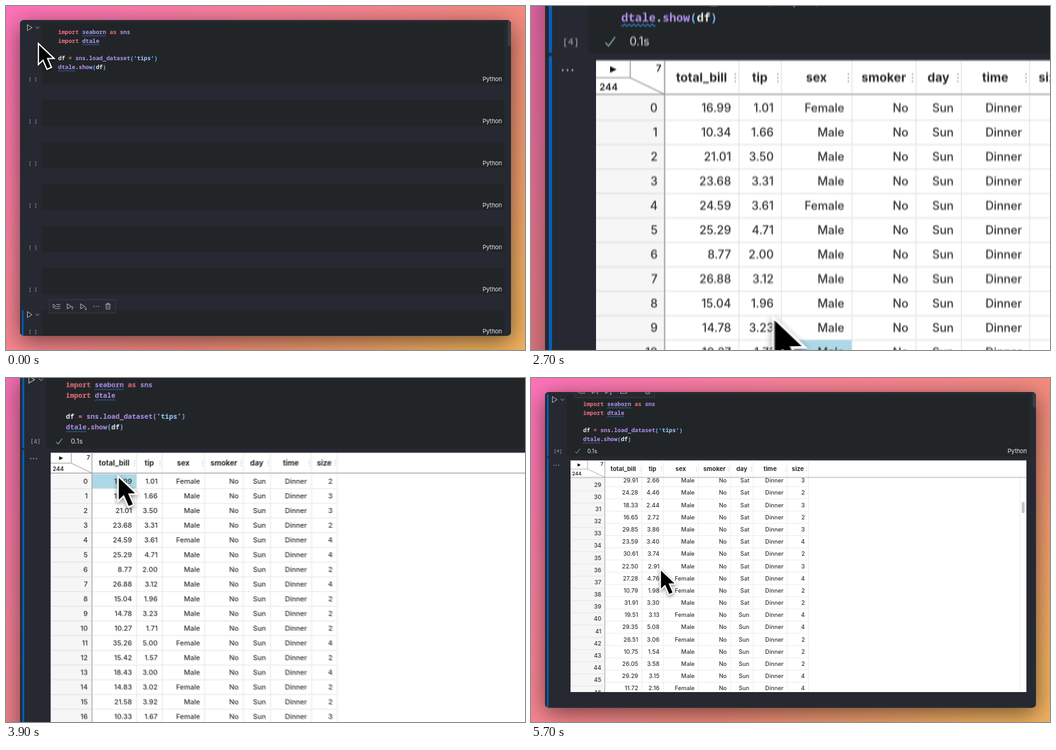
Write an HTML page with a canvas that moves like this. It is 814 by 540 pixels and loops after 5.8 s.

```html
<!DOCTYPE html>
<html lang="en">
<head>
<meta charset="utf-8">
<title>Notebook demo</title>
<style>
html, body { margin: 0; width: 100%; height: 100%; overflow: hidden; background: #f58a86; }
canvas { display: block; width: 814px; height: 540px; }
</style>
</head>
<body>
<canvas id="stage" width="814" height="540"></canvas>
<script>
const W = 814, H = 540, LOOP = 5800, STEP = 100;
const RUN = 900, DONE = 1400, BLANK = 1700, LOADED = 2300;
const SANS = 'Inter, Roboto, sans-serif';
const MONO = '"Noto Sans Mono", "DejaVu Sans Mono", monospace';

const view = document.getElementById('stage').getContext('2d');
const buffer = document.createElement('canvas');
buffer.width = W;
buffer.height = H;
const c = buffer.getContext('2d');

// ---------- table data ----------
// The opening rows are written out, the ones scrolled past are generated.
const opening = `16.99 1.01 F2,10.34 1.66 M3,21.01 3.50 M3,23.68 3.31 M2,24.59 3.61 F4,25.29 4.71 M4,
8.77 2.00 M2,26.88 3.12 M4,15.04 1.96 M2,14.78 3.23 M2,10.27 1.71 M2,35.26 5.00 F4,
15.42 1.57 M2,18.43 3.00 M4,14.83 3.02 F2,21.58 3.92 M2,10.33 1.67 F3,16.29 3.71 M3`;

let seed = 7;
function random() {
  seed = seed * 16807 % 2147483647;
  return seed / 2147483647;
}
function guest() {
  const bill = 9 + 23 * random(), tip = 1 + bill * (0.05 + 0.1 * random());
  const sex = random() < 0.2 ? 'F' : 'M';
  return `${bill.toFixed(2)} ${tip.toFixed(2)} ${sex}${2 + Math.floor(3 * random())}`;
}
const records = opening.split(',');
while (records.length < 48) records.push(guest());
const rows = records.map((record, i) => {
  const [bill, tip, [sex, size]] = record.trim().split(' ');
  return [bill, tip, sex === 'F' ? 'Female' : 'Male', 'No', i > 18 && i < 41 ? 'Sat' : 'Sun', 'Dinner', size];
});

const GRID = { left: 62, top: 129.5, right: 777, bottom: 493, body: 156.5, side: 115.8, first: 166.7, row: 19.18 };
let edge = GRID.side;
const columns = Object.entries({ total_bill: 58.2, tip: 33.4, sex: 55.3, smoker: 50.3, day: 35.5, time: 53.5, size: 33.5 })
  .map(([name, width]) => ({ name, left: edge, right: edge += width }));

// ---------- motion ----------
// Monotone cubic through [time, ...values] keys: holds stay flat, peaks do not overshoot.
function track(keys, t, k = 1) {
  const n = keys.length;
  if (t <= keys[0][0]) return keys[0][k];
  if (t >= keys[n - 1][0]) return keys[n - 1][k];
  let i = 0;
  while (t > keys[i + 1][0]) i++;
  const slope = j => (keys[j + 1][k] - keys[j][k]) / (keys[j + 1][0] - keys[j][0]);
  const tangent = j => {
    if (j === 0 || j === n - 1) return 0;
    const a = slope(j - 1), b = slope(j);
    return a * b > 0 ? 2 * a * b / (a + b) : 0;
  };
  const h = keys[i + 1][0] - keys[i][0], u = (t - keys[i][0]) / h, v = 1 - u;
  return v * v * ((1 + 2 * u) * keys[i][k] + u * h * tangent(i)) +
    u * u * ((3 - 2 * u) * keys[i + 1][k] - v * h * tangent(i + 1));
}

// Critically damped spring: what is left of the way, 1 to 0.
function left(t, start) {
  const w = Math.max(0, t - start) * 0.0063;
  return (1 + w) * Math.exp(-w);
}

const zoom = t => 1 + left(t, 3428) - left(t, 533);
const pan = t => track([[2250, 0], [3020, 242], [3130, 242], [3630, 167]], t);
const scrollAt = t => track([[4600, 0], [5000, 150], [5700, 581], [5900, 702]], t);
const path = [[150, 50, 57], [900, 37, 36], [1200, 40, 46], [2100, 46.5, 138], [2900, 228, 358], [3100, 224, 343],
  [3500, 162, 193.5], [3750, 149, 158], [3950, 149, 158], [4300, 164, 248], [4480, 202, 298]];
const pointerAt = t => [track(path, t, 1), track(path, t, 2)];

// ---------- drawing helpers ----------
function rect(x, y, w, h, fill) {
  c.fillStyle = fill;
  c.fillRect(x, y, w, h);
}
function line(color, width, ...pts) {
  c.strokeStyle = color;
  c.lineWidth = width;
  c.beginPath();
  for (let i = 0; i < pts.length; i += 2) c.lineTo(pts[i], pts[i + 1]);
  c.stroke();
}
function text(str, x, y, font, fill, align = 'left') {
  c.font = font;
  c.fillStyle = fill;
  c.textAlign = align;
  c.textBaseline = 'alphabetic';
  c.fillText(str, x, y);
}
function dots(x, y, dx, dy, r, fill) {
  c.fillStyle = fill;
  for (let i = -1; i < 2; i++) {
    c.beginPath();
    c.arc(x + i * dx, y + i * dy, r, 0, 7);
    c.fill();
  }
}
function box(x, y, w, h, color, width) {
  c.strokeStyle = color;
  c.lineWidth = width;
  c.strokeRect(x, y, w, h);
}
const ICON = '#c3c5c8';
function play(x, y, k = 1) {
  line(ICON, 0.9, x - 3.5 * k, y - 4.6 * k, x + 4 * k, y, x - 3.5 * k, y + 4.6 * k, x - 3.5 * k, y - 5 * k);
}
function chevron(x, y) {
  line(ICON, 0.8, x - 2.8, y - 1.3, x, y + 1.4, x + 2.8, y - 1.3);
}

// ---------- notebook ----------
const RED = '#ec7080', PURPLE = '#b392f0', BLUE = '#79b8ff', PALE = '#9ecbff', WHITE = '#eceef0';
const CELL = '#212527', PANE = '#262931', BAR = '#0560bd';
const CH = 5.38;
const code = [
  [['import ', RED], ['seaborn', PURPLE, 1], [' as ', RED], ['sns', PURPLE]],
  [['import ', RED], ['dtale', PURPLE, 1]],
  [],
  [['df ', WHITE], ['= ', RED], ['sns', PURPLE], ['.', WHITE], ['load_dataset', PURPLE], ['(', BLUE], ["'tips'", PALE], [')', BLUE]],
  [['dtale', PURPLE, 1], ['.', WHITE], ['show', PURPLE], ['(', BLUE], ['df', WHITE], [')', BLUE]]
];

function squiggle(x, y, w) {
  c.strokeStyle = '#3a8ee0';
  c.lineWidth = 0.75;
  c.beginPath();
  for (let i = 0; i <= w; i += 0.4) c.lineTo(x + i, y + 0.75 * Math.sin(i * 1.75));
  c.stroke();
}

function drawCode() {
  code.forEach((parts, row) => {
    let x = 81.8;
    const y = 43.9 + 13.75 * row;
    for (const [str, color, wavy] of parts) {
      text(str, x, y, `600 8.97px ${MONO}`, color);
      if (wavy) squiggle(x, y + 2.9, str.length * CH);
      x += str.length * CH;
    }
  });
}

function trash(x, y) {
  line(ICON, 0.8, x - 4.2, y - 3.2, x + 4.2, y - 3.2);
  box(x - 1.4, y - 4.8, 2.8, 1.6, ICON, 0.8);
  line(ICON, 0.8, x - 3.2, y - 3, x - 2.9, y + 4.3, x + 2.9, y + 4.3, x + 3.2, y - 3);
  for (const d of [-1.1, 1.1]) line(ICON, 0.6, x + d, y - 1.4, x + d, y + 2.8);
}

function toolbar(y, split) {
  const w = split ? 126 : 104, end = 56 + w + (split ? 1 : 0);
  rect(68, y - 10.5, w, 21, PANE);
  box(68, y - 10.5, w, 21, '#43464d', 0.7);
  line(ICON, 0.8, 74, y - 3.5, 74, y + 2.5, 78, y - 0.5, 74, y - 3.5);
  for (let i = 0; i < 3; i++) line(ICON, 0.8, i < 2 ? 79 : 76, y - 3 + i * 3.2, 85, y - 3 + i * 3.2);
  for (const d of [-1, 1]) {
    const x = 110 + d * 10.5, m = y + 3;
    play(x - 0.5, y, 0.85);
    line(ICON, 0.8, x + 4.5, m - 2.4, x + 4.5, m + 2.4);
    line(ICON, 0.8, x + 2.8, m + d, x + 4.5, m + d * 2.7, x + 6.2, m + d);
  }
  if (split) {
    box(140.5, y - 4, 9.5, 7.6, ICON, 0.8);
    line(ICON, 0.8, 140.5, y, 150, y);
  }
  dots(end - 18.5, y, 3.6, 0, 0.7, ICON);
  trash(end, y);
}

function cellFoot(y, count) {
  text(`[${count}]`, 42.2, y + 2.6, `7.6px ${MONO}`, '#a9abae', 'center');
  text('Python', 778, y + 3.2, `9.2px ${SANS}`, '#e9eaeb', 'right');
}

function idleCells() {
  for (let i = 0; i < 6; i++) {
    const y = 148 + 65.9 * i;
    rect(56, y, 725.5, 40.5, CELL);
    cellFoot(y + 32.8, ' ');
  }
  rect(25, 477, 2.4, 41, BAR);
  play(37, 484.5);
  chevron(49.3, 484.5);
  toolbar(471.5, false);
}

function spinner(x, y, r, turn) {
  for (const a of [turn, turn + Math.PI]) {
    c.strokeStyle = ICON;
    c.lineWidth = 0.9;
    c.beginPath();
    c.arc(x, y, r, a, a + 2.5);
    c.stroke();
    const ex = x + r * Math.cos(a + 2.5), ey = y + r * Math.sin(a + 2.5);
    line(ICON, 0.9, ex - 1.8, ey - 1, ex, ey, ex + 1.1, ey - 1.9);
  }
}

function runState(t) {
  if (t < DONE) {
    box(34, 30.5, 6.6, 6.4, ICON, 0.9);
    spinner(73.6, 114.6, 3.8, 0.3 + (t - RUN) / 160);
  } else {
    play(37, 34);
    line('#8fb89a', 0.9, 69.3, 115.4, 71.8, 118, 77, 111);
  }
  text(t < RUN + 200 ? '0.0s' : '0.1s', 88.2, 117.7, `9px ${SANS}`, '#e4e5e7');
}

function drawNotebook(t) {
  const ran = t >= RUN;
  rect(22, 22, 770, 496, PANE);
  rect(56.2, 25.8, 725.3, 97.6, CELL);
  rect(787, 22, 5, ran ? 24 : 41, '#3a3d44');
  drawCode();
  chevron(49.3, 34);
  cellFoot(114.6, ran ? '4' : ' ');
  if (!ran) {
    play(37, 34);
    idleCells();
    return;
  }
  rect(25, 25.6, 2.5, 97.8, BAR);
  rect(25, 125.8, 2.5, 392, BAR);
  toolbar(20.5, true);
  runState(t);
  dots(39.7, 137, 3.8, 0, 0.75, '#c0c2c5');
  if (t >= BLANK) rect(GRID.left, GRID.top, GRID.right - GRID.left, GRID.bottom - GRID.top, '#fff');
  if (t >= LOADED) drawGrid(t);
}

// ---------- grid ----------
const RULE = '#e4e4e4', EDGE = '#a9a9a9', INK = '#353535';

function eachRow(scroll, draw) {
  rows.forEach((row, i) => {
    const y = GRID.first + i * GRID.row - scroll;
    if (y > GRID.body - 12 && y < GRID.bottom + 12) draw(row, i, y);
  });
}

function gridBody(t) {
  const g = GRID, half = g.row / 2, font = `500 9.1px ${SANS}`, scroll = scrollAt(t);
  // The hover state runs a little ahead of the smoothed pointer.
  const [hx, hy] = pointerAt(t + 140);
  c.save();
  c.beginPath();
  c.rect(g.left, g.body, g.right - g.left, g.bottom - g.body);
  c.clip();
  eachRow(scroll, (row, i, y) => {
    columns.forEach((col, k) => {
      const hover = !scroll && hx >= col.left && hx < col.right && Math.abs(hy - y) < half;
      if (hover) rect(col.left, y - half, col.right - col.left, g.row, '#add8e6');
      text(row[k], col.right - 6, y + 3.2, font, INK, 'right');
      line(RULE, 0.7, col.right, y - half, col.right, y + half);
    });
    line(RULE, 0.7, g.side, y + half, edge, y + half);
  });
  // Row labels trail the cells while scrolling.
  rect(g.left, g.body, g.side - g.left, g.bottom - g.body, '#f6f6f6');
  eachRow(scrollAt(t - 41), (row, i, y) => {
    text(i, 110.3, y + 3.2, font, INK, 'right');
    line('#dedede', 0.7, g.left, y + half, g.side - 1.2, y + half);
  });
  c.restore();

  line(RULE, 0.7, 767, g.body, 767, g.bottom);
  c.fillStyle = '#c6c6c6';
  c.beginPath();
  c.roundRect(769.6, 158.5 + scroll * 0.062, 4.4, 17.5, 1.5);
  c.fill();
}

function gridHead() {
  const g = GRID;
  for (const col of columns) {
    text(col.name, (col.left + col.right) / 2 - 0.2, 146.2, `700 9.6px ${SANS}`, '#2c2c2c', 'center');
    dots(col.right - 2.8, 143, 0, 2.9, 0.6, '#6fb3c9');
    line(RULE, 0.7, col.right, g.top, col.right, g.body);
  }
  line(EDGE, 1.1, g.left, 156, g.right, 156);
  line(EDGE, 1.1, g.side, g.top, g.side, g.bottom);
  line('#8d8d8d', 0.7, g.left, 143, 88.8, 143, 88.8, g.top);
  line('#8d8d8d', 0.7, 88.8, 143, g.side, 156);
  line('#b5b5b5', 0.7, g.left, g.top, g.right, g.top);
  c.fillStyle = '#111';
  c.beginPath();
  c.moveTo(73, 134);
  c.lineTo(78.2, 136.5);
  c.lineTo(73, 139);
  c.fill();
  text('7', 113.3, 138.2, `600 7.5px ${SANS}`, '#222', 'right');
  text('244', 64.6, 152.9, `600 7.5px ${SANS}`, '#222');
}

function drawGrid(t) {
  gridBody(t);
  gridHead();
}

// ---------- pointer and scene ----------
const arrow = new Path2D('M1.8 4.2V32.6L8.4 26.4 14.8 41 20 38.7 13.8 24.6 23 24.4Z');

function pointer(x, y, scale) {
  c.save();
  c.translate(x, y);
  c.shadowColor = 'rgba(0,0,0,.45)';
  c.shadowBlur = 5 * scale;
  c.shadowOffsetY = 2 * scale;
  c.lineWidth = 4;
  c.strokeStyle = '#fff';
  c.stroke(arrow);
  c.shadowColor = 'transparent';
  c.fillStyle = '#000';
  c.fill(arrow);
  c.restore();
}

const sky = c.createLinearGradient(0, 0, 600, 640);
['#ff72ba', '#fb839a', '#f38b7c', '#f0b060'].forEach((color, i) => sky.addColorStop(i / 3, color));

function drawScene(t, camT) {
  const s = zoom(camT), o = 22 - 22 * s;
  c.setTransform(1, 0, 0, 1, 0, 0);
  rect(0, 0, W, H, sky);
  c.setTransform(s, 0, 0, s, o, o - (s - 1) * pan(camT));
  c.save();
  c.beginPath();
  c.roundRect(22, 22, 770, 495.5, 6);
  c.shadowColor = 'rgba(0,0,0,.55)';
  c.shadowBlur = 36 * s;
  c.shadowOffsetY = 8 * s;
  c.fillStyle = PANE;
  c.fill();
  c.shadowColor = 'transparent';
  c.clip();
  drawNotebook(t);
  c.restore();
  pointer(...pointerAt(camT), s);
}

// Camera and pointer are averaged over a short shutter; screen content is not.
function render(t) {
  const n = t ? 8 : 1, shutter = 8;
  for (let i = 0; i < n; i++) {
    drawScene(t, t + ((i + 0.5) / n - 0.5) * shutter);
    view.globalAlpha = 1 / (i + 1);
    view.drawImage(buffer, 0, 0);
  }
}

const start = performance.now();
let shown = -1;
function tick() {
  const now = (performance.now() - start) % LOOP;
  const t = now < 200 ? 0 : Math.floor(now / STEP) * STEP;
  if (t !== shown) render(shown = t);
  requestAnimationFrame(tick);
}
tick();
</script>
</body>
</html>
```
